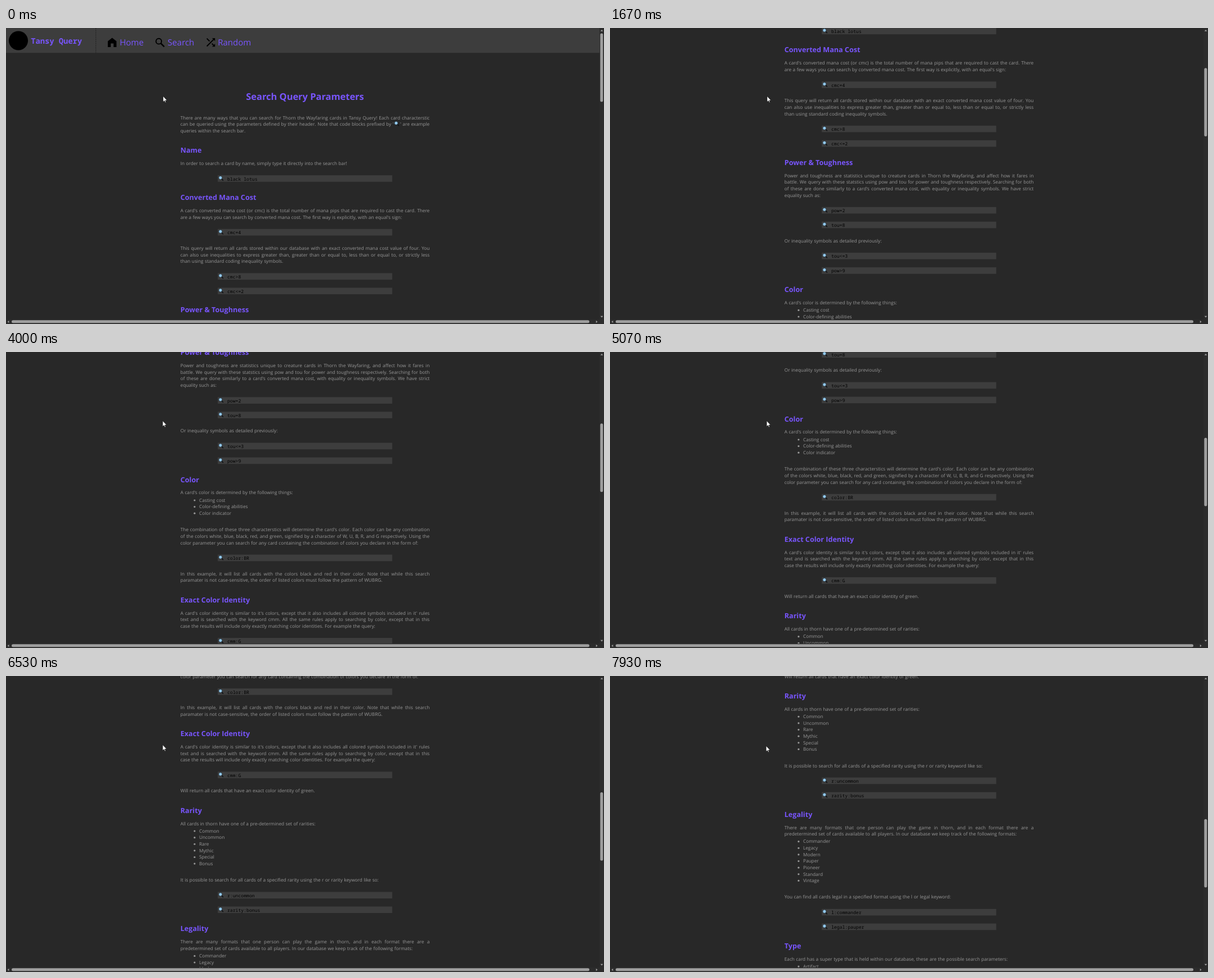
These frames come from a looping animation (1062 px wide and 527 px high, 8000 ms). An HTML page with a canvas:

```html
<!DOCTYPE html>
<html lang="en">
<head>
<meta charset="utf-8">
<title>Search Query Parameters</title>
<style>
  html, body { margin: 0; width: 100%; height: 100%; overflow: hidden; background: #282828; }
  canvas { display: block; width: 1062px; height: 527px; }
</style>
</head>
<body>
<canvas id="stage"></canvas>
<script>
const W = 1062, H = 527, LOOP = 8000;
const S = W / 1920;                 // page units to stage pixels
const VIEW_W = 1054, VIEW_H = 519;  // area inside the scrollbars
const LEFT = 560, WIDTH = 800, LINE = 21;

const SANS = '"Open Sans", "Noto Sans", sans-serif';
const MONO = '"Noto Sans Mono", "DejaVu Sans Mono", monospace';
const FONT = {
  body: `14.94px ${SANS}`,
  title: `bold 29.7px ${SANS}`,
  head: `bold 22.75px ${SANS}`,
  nav: `27.2px ${SANS}`,
  brand: `bold 24.9px ${MONO}`,
  code: `14.67px ${MONO}`
};
const PURPLE = '#7855fc', GREY = '#989898', PANEL = '#3d3d3d', BACK = '#282828';
const SPACE = 4.38, LENS = '@', LENS_W = 27;

// h heading, p paragraph, q query bars, u list
const blocks = [
  ['p', 'There are many ways that you can search for Thorn the Wayfaring cards in Tansy Query! Each card characterstic',
    'can be queried using the parameters defined by their header. Note that code blocks prefixed by @ are example',
    'queries within the search bar.'],
  ['h', 'Name'],
  ['p', 'In order to search a card by name, simply type it directly into the search bar!'],
  ['q', 'black lotus'],
  ['h', 'Converted Mana Cost'],
  ['p', "A card's converted mana cost (or cmc) is the total number of mana pips that are required to cast the card. There",
    "are a few ways you can search by converted mana cost. The first way is explicitly, with an equal's sign:"],
  ['q', 'cmc=4'],
  ['p', 'This query will return all cards stored within our database with an exact converted mana cost value of four. You',
    'can also use inequalities to express greater than, greater than or equal to, less than or equal to, or strictly less',
    'than using standard coding inequality symbols.'],
  ['q', 'cmc>8', 'cmc<=2'],
  ['h', 'Power & Toughness'],
  ['p', 'Power and toughness are statistics unique to creature cards in Thorn the Wayfaring, and affect how it fares in',
    'battle. We query with these statstics using pow and tou for power and toughness respectively. Searching for both',
    "of these are done similarly to a card's converted mana cost, with equality or inequality symbols. We have strict",
    'equality such as:'],
  ['q', 'pow=2', 'tou=8'],
  ['p', 'Or inequality symbols as detailed previously:'],
  ['q', 'tou<=3', 'pow>9'],
  ['h', 'Color'],
  ['p', "A card's color is determined by the following things:"],
  ['u', 'Casting cost', 'Color-defining abilities', 'Color indicator'],
  ['p', "The combination of these three characterstics will determine the card's color. Each color can be any combination",
    'of the colors white, blue, black, red, and green, signified by a character of W, U, B, R, and G respectively. Using the',
    'color parameter you can search for any card containing the combination of colors you declare in the form of:'],
  ['q', 'color:BR'],
  ['p', 'In this example, it will list all cards with the colors black and red in their color. Note that while this search',
    'paramater is not case-sensitive, the order of listed colors must follow the pattern of WUBRG.'],
  ['h', 'Exact Color Identity'],
  ['p', "A card's color identity is similar to it's colors, except that it also includes all colored symbols included in it' rules",
    'text and is searched with the keyword cmm. All the same rules apply to searching by color, except that in this',
    'case the results will include only exactly matching color identities. For example the query:'],
  ['q', 'cmm:G'],
  ['p', 'Will return all cards that have an exact color identity of green.'],
  ['h', 'Rarity'],
  ['p', 'All cards in thorn have one of a pre-determined set of rarities:'],
  ['u', 'Common', 'Uncommon', 'Rare', 'Mythic', 'Special', 'Bonus'],
  ['p', 'It is possible to search for all cards of a specified rarity using the r or rarity keyword like so:'],
  ['q', 'r:uncommon', 'rarity:bonus'],
  ['h', 'Legality'],
  ['p', 'There are many formats that one person can play the game in thorn, and in each format there are a',
    'predetermined set of cards available to all players. In our database we keep track of the following formats:'],
  ['u', 'Commander', 'Legacy', 'Modern', 'Pauper', 'Pioneer', 'Standard', 'Vintage'],
  ['p', 'You can find all cards legal in a specified format using the l or legal keyword:'],
  ['q', 'l:commander', 'legal:pauper'],
  ['h', 'Type'],
  ['p', 'Each card has a super type that is held within our database, these are the possible search parameters:'],
  ['u', 'Artifact']
];
const GAP = { ph: 36, qh: 33, hp: 16, pq: 29, qp: 29, pu: 3, up: 32 };
const BAR_GAP = 26;

// Wheel bursts in ticks of 1/15 s: first tick, ease start, ease end, target
const bursts = [
  [6, 5.3, 10, 200],
  [21, 20.4, 26, 500],
  [39, 37.76, 46, 800],
  [58, 57.33, 64, 1100],
  [76, 75.76, 84, 1500],
  [98, 96.25, 108, 1800],
  [117, 116.5, 123.56, 2100]
];

const canvas = document.getElementById('stage');
const ctx = canvas.getContext('2d');
const dpr = window.devicePixelRatio || 1;
canvas.width = W * dpr;
canvas.height = H * dpr;

function layout() {
  const items = [];
  let y = 277, prev = '';
  for (const [kind, ...rows] of blocks) {
    y += GAP[prev + kind] || 0;
    rows.forEach((text, i) => {
      if (kind === 'q' && i) y += BAR_GAP;
      items.push({ kind, text, y, last: i === rows.length - 1 });
      y += kind === 'h' ? 32 : LINE;
    });
    prev = kind;
  }
  return items;
}
const items = layout();

function scrollAt(tick) {
  let pos = 0;
  for (const [first, from, to, target] of bursts) {
    if (tick < first) break;
    const x = Math.min(1, (tick - from) / (to - from));
    pos += (target - pos) * x * x * (3 - 2 * x);
  }
  return pos;
}

function text(str, x, y, font, color, align = 'left') {
  ctx.font = font;
  ctx.fillStyle = color;
  ctx.textAlign = align;
  ctx.fillText(str, x, y);
}

function line(x1, y1, x2, y2, color, width) {
  ctx.strokeStyle = color;
  ctx.lineWidth = width;
  ctx.beginPath();
  ctx.moveTo(x1, y1);
  ctx.lineTo(x2, y2);
  ctx.stroke();
}

function disc(x, y, r, color) {
  ctx.fillStyle = color;
  ctx.beginPath();
  ctx.arc(x, y, r, 0, 2 * Math.PI);
  ctx.fill();
}

function poly(points, color) {
  ctx.fillStyle = color;
  ctx.beginPath();
  points.forEach(([x, y]) => ctx.lineTo(x, y));
  ctx.closePath();
  ctx.fill();
}

function lens(x, y) {
  line(x + 3.5, y + 3.5, x + 9, y + 9, '#0e1114', 3);
  disc(x, y, 5.8, '#2b3d49');
  disc(x, y, 4.6, '#93c8ea');
}

function paragraphLine({ text: str, y, last }) {
  ctx.font = FONT.body;
  const words = str.split(' ');
  const widths = words.map(w => w === LENS ? LENS_W : ctx.measureText(w).width);
  const total = widths.reduce((a, b) => a + b, 0);
  const gap = last ? SPACE : (WIDTH - total) / (words.length - 1);
  let x = LEFT;
  words.forEach((word, i) => {
    if (word === LENS) {
      text("'", x, y + 17, FONT.body, GREY);
      lens(x + 11, y + 8);
      text("'", x + 24, y + 17, FONT.body, GREY);
    } else {
      text(word, x, y + 17, FONT.body, GREY);
    }
    x += widths[i] + gap;
  });
}

function listLine({ text: str, y }) {
  disc(605.5, y + 12, 2.9, GREY);
  ctx.wordSpacing = '0.5px';
  text(str, 620, y + 17, FONT.body, GREY);
  ctx.wordSpacing = '0px';
}

function queryBar({ text: str, y }) {
  ctx.fillStyle = PANEL;
  ctx.fillRect(680, y, 560, LINE);
  lens(688.5, y + 8);
  text(str, 710.5, y + 17, FONT.code, '#000');
}

const drawItem = {
  h: it => text(it.text, LEFT, it.y + 25.3, FONT.head, PURPLE),
  p: paragraphLine,
  u: listLine,
  q: queryBar
};

const shuffle = new Path2D('M10.59 9.17 5.41 4 4 5.41l5.17 5.17zM14.5 4l2.04 2.04L4 18.59 5.41 20 17.96 7.46 20 9.5V4z' +
  'm.33 9.41-1.41 1.41 3.13 3.13L14.5 20H20v-5.5l-2.04 2.04z');

function header() {
  ctx.fillStyle = PANEL;
  ctx.fillRect(0, 0, 1920, 80);
  ctx.setLineDash([3, 3]);
  line(288.5, 0, 288.5, 80, '#000', 1);
  ctx.setLineDash([]);
  text('Tansy Query', 80, 50, FONT.brand, PURPLE);
  text('Home', 365, 56.5, FONT.nav, PURPLE);
  text('Search', 519, 56.5, FONT.nav, PURPLE);
  text('Random', 680, 56.5, FONT.nav, PURPLE);

  ctx.save();
  ctx.scale(1 / S, 1 / S);
  disc(22, 22.5, 17, '#000');
  poly([[188.5, 17.5], [196.2, 23.5], [196.2, 34], [191, 34], [191, 27.6], [186, 27.6],
    [186, 34], [180.8, 34], [180.8, 23.5]], '#000');
  ctx.strokeStyle = '#000';
  ctx.lineWidth = 2;
  ctx.beginPath();
  ctx.arc(271.3, 23.7, 4.9, 0, 2 * Math.PI);
  ctx.stroke();
  line(274.8, 27.2, 281, 33.4, '#000', 2.5);
  ctx.translate(352.2, 14.2);
  ctx.scale(0.95, 0.95);
  ctx.fill(shuffle);
  ctx.restore();
}

function page(scroll) {
  ctx.save();
  ctx.beginPath();
  ctx.rect(0, 0, VIEW_W, VIEW_H);
  ctx.clip();
  ctx.scale(S, S);
  ctx.translate(0, -scroll);
  if (scroll < 80) header();
  text('Search Query Parameters', 960, 231.5, FONT.title, PURPLE, 'center');
  for (const it of items) {
    const top = it.y - scroll;
    if (top > -40 && top < 945) drawItem[it.kind](it);
  }
  ctx.restore();
}

function pill(x, y, w, h) {
  ctx.fillStyle = '#9f9f9f';
  ctx.beginPath();
  ctx.roundRect(x, y, w, h, 2.5);
  ctx.fill();
}

function arrow(x, y, dx, dy) {
  const tip = [x + dx * 1.5, y + dy * 1.5];
  const bx = x - dx * 1.2, by = y - dy * 1.2;
  poly([tip, [bx + dy * 2.3, by + dx * 2.3], [bx - dy * 2.3, by - dx * 2.3]], '#9f9f9f');
}

function scrollbars(scroll) {
  ctx.fillStyle = '#2c2c2c';
  ctx.fillRect(VIEW_W, 0, W - VIEW_W, H);
  ctx.fillRect(0, VIEW_H, W, H - VIEW_H);
  pill(1055.3, 9.6 + scroll * 0.13, 5, 121.8);
  pill(10, 520.3, 1026, 5);
  arrow(1058, 4.5, 0, -1);
  arrow(1058, 514, 0, 1);
  arrow(4.2, 523, -1, 0);
  arrow(1049, 523, 1, 0);
}

function cursor(tick) {
  const [x, y] = tick < 58 ? [279, 121.4] : tick < 100 ? [278.2, 122.5] : [277.2, 124.4];
  ctx.save();
  ctx.translate(x, y);
  ctx.scale(0.6, 0.6);
  poly([[0, 0], [0, 17], [4, 13.4], [6.4, 19], [8.8, 18], [6.5, 12.5], [11.8, 12.5]], '#fff');
  ctx.strokeStyle = '#000';
  ctx.lineWidth = 0.9;
  ctx.stroke();
  ctx.restore();
}

function draw(ms) {
  const tick = Math.floor(ms * 0.015 + 0.06);
  const scroll = scrollAt(tick);
  ctx.setTransform(dpr, 0, 0, dpr, 0, 0);
  ctx.textRendering = 'geometricPrecision';
  ctx.fillStyle = BACK;
  ctx.fillRect(0, 0, W, H);
  page(scroll);
  scrollbars(scroll);
  cursor(tick);
}

const start = performance.now();
function loop() {
  draw((performance.now() - start) % LOOP);
  requestAnimationFrame(loop);
}
loop();
</script>
</body>
</html>
```
